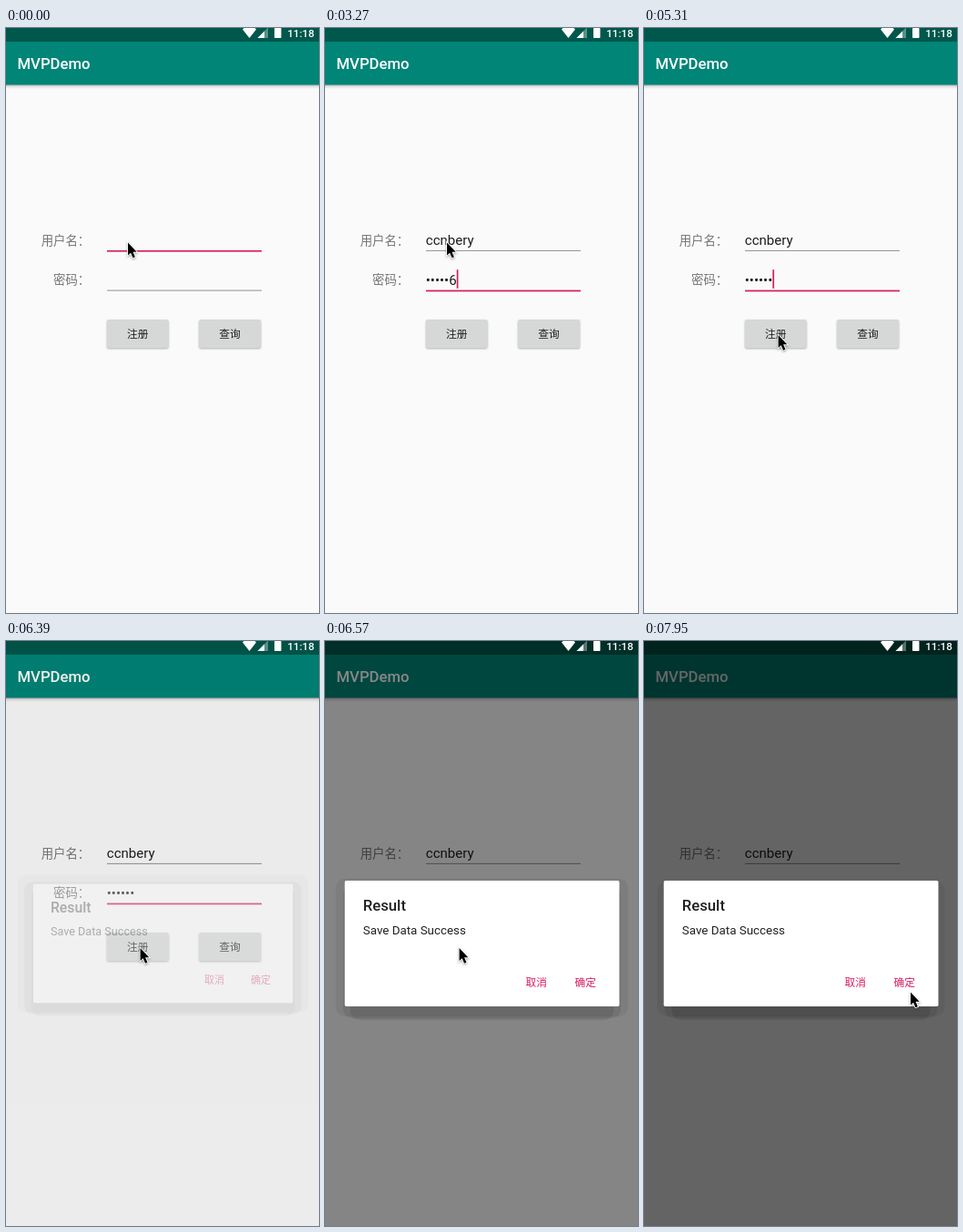
Write an HTML page that moves like this. It is 344 by 642 pixels and loops after 8000 ms.

```html
<!DOCTYPE html>
<html lang="zh-CN">
<head>
<meta charset="utf-8">
<title>MVPDemo</title>
<style>
  html, body { margin: 0; width: 100%; height: 100%; overflow: hidden; background: #fafafa; }
  svg { display: block; width: 100vw; height: 100vh; }
  text { font-family: Roboto, 'Noto Sans CJK SC', 'Noto Sans CJK', sans-serif; white-space: pre; }
  .title { font-size: 16.72px; font-weight: 500; }
  .label { font-size: 13.38px; fill: #757575; }
  .input { font-size: 15.05px; fill: #1d1d1d; }
  .button { font-size: 11.7px; fill: #202020; text-anchor: middle; }
  .accent { fill: #d81b60; }
  .raised { fill: #d6d7d7; filter: drop-shadow(0 1px 1px rgba(0,0,0,.3)); }
  .pressed { fill: #c4c5c5; filter: drop-shadow(0 2px 1.5px rgba(0,0,0,.38)); }
</style>
</head>
<body>
<svg viewBox="0 0 344 642">
  <defs>
    <linearGradient id="barShadow" x2="0" y2="1">
      <stop offset="0" stop-opacity=".32"/>
      <stop offset=".45" stop-opacity=".1"/>
      <stop offset="1" stop-opacity="0"/>
    </linearGradient>
  </defs>
  <rect width="344" height="642" fill="#fafafa"/>
  <rect y="62" width="344" height="5" fill="url(#barShadow)"/>
  <rect width="344" height="62.4" fill="#008577"/>
  <rect width="344" height="15" fill="#00574b"/>
  <text class="title" x="12.5" y="45.3" fill="#fff">MVPDemo</text>

  <text class="label" x="38.7" y="237.8">用户名：</text>
  <text class="label" x="52" y="281.3">密码：</text>
  <rect id="userLine" x="111" width="170"/>
  <rect id="passLine" x="111" width="170"/>
  <text id="user" class="input" x="110.8" y="238"></text>
  <text id="pass" class="input" x="110.8" y="281.7"></text>
  <rect id="caret" class="accent" width="1.7" height="20.6"/>

  <rect id="register" x="111" y="320" width="67.5" height="31" rx="1.7"/>
  <rect class="raised" x="212.3" y="320" width="67.7" height="31" rx="1.7"/>
  <text class="button" x="144.7" y="340">注册</text>
  <text class="button" x="246" y="340">查询</text>

  <rect id="dim" width="344" height="642"/>
  <g fill="#fff">
    <path d="M260 1.5Q261.500 0 263 -1H272Q273.500 0 275 1.500L267.500 11Z"/>
    <path d="M276.500 11 288 -.5V11Z" fill-opacity=".35"/>
    <path d="M276.500 11 284 3.500V11Z"/>
    <rect x="295" y="0" width="7.500" height="11" rx=".7"/>
    <text x="309.200" y="10.200" font-size="11.7" font-weight="500">11:18</text>
  </g>

  <g id="dialog">
    <g id="shadows">
      <rect fill-opacity=".06"/>
      <rect fill-opacity=".09"/>
      <rect fill-opacity=".09"/>
    </g>
    <rect x="21.700" y="263" width="301.800" height="138" rx="1.700" fill="#fff"/>
    <text class="title" x="41.800" y="296" fill="#212121">Result</text>
    <text x="41.800" y="322" font-size="13.38" fill="#212121">Save Data Success</text>
    <text class="button" x="232.300" y="378.700" style="fill:#d81b60">取消</text>
    <text class="button" x="286.300" y="378.700" style="fill:#d81b60">确定</text>
  </g>

  <path id="cursor" d="M0 0V14L3.100 11.200 5.500 16.700 7.900 15.700 5.500 10.300H9.700Z"
    stroke="#fff" stroke-width="1.800" paint-order="stroke"
    style="filter:drop-shadow(0 1px 1px rgba(0,0,0,.35))"/>
</svg>
<script>
const LOOP = 8000, BLINK = 530;
const USER = 'ccnbery', PASSWORD = '123456';
const userKeys = [90, 170, 350, 530, 700, 1150, 1230];
const passKeys = [2120, 2300, 2470, 2830, 3100, 3270];
const FOCUS = 1500, MASK = 4780, PRESS = 5850;
const dialogTicks = [6390, 6480, 6570, 6680];

const el = id => document.getElementById(id);
const set = (node, attrs) => {
  for (const name in attrs) node.setAttribute(name, attrs[name]);
};
const countPast = (times, t) => times.filter(time => time <= t).length;
const clamp = x => Math.max(0, Math.min(1, x));
const smooth = x => x * x * (3 - 2 * x);

// Progress of a movement that advances in equal, held steps.
const stepped = (t, start, end, steps) =>
  clamp((Math.floor((t - start) / ((end - start) / (steps - 1)) + 1e-6) + 1) / steps);

function drawLine(id, y, focused) {
  set(el(id), { y, height: focused ? 1.7 : 0.9, fill: focused ? '#d81b60' : '#858585' });
}

function caretVisible(t) {
  if (t < userKeys[0] || t >= PRESS) return false;
  if (t < passKeys[0]) return t < FOCUS + BLINK;
  if (t < 3720) return true;
  return Math.floor((t - 3720) / BLINK) % 2 === 1;
}

function drawForm(t) {
  const inPassword = t >= FOCUS;
  const typed = countPast(passKeys, t);
  const hidden = t >= MASK ? typed : Math.max(0, typed - 1);
  el('user').textContent = USER.slice(0, countPast(userKeys, t));
  el('pass').textContent = '•'.repeat(hidden) + PASSWORD.slice(hidden, typed);
  drawLine('userLine', 243.9, !inPassword);
  drawLine('passLine', 287.6, inPassword);

  const field = el(inPassword ? 'pass' : 'user');
  set(el('caret'), {
    x: 110.9 + field.getComputedTextLength(),
    y: inPassword ? 265.2 : 221.3,
    visibility: caretVisible(t) ? 'visible' : 'hidden'
  });
  set(el('register'), { class: t >= PRESS && t < dialogTicks[0] ? 'pressed' : 'raised' });
}

function drawDialog(t) {
  const ticks = countPast(dialogTicks, t);
  const age = ticks ? dialogTicks[ticks - 1] - 6365 : 0;
  const dim = 0.6 * clamp(age / 262);
  const scale = 1 - 0.1 * (1 - clamp(age / 220)) ** 5;
  set(el('dim'), { 'fill-opacity': dim });
  set(el('dialog'), {
    opacity: 1 - (1 - clamp(age / 150)) ** 2,
    transform: `translate(172.5 332) scale(${scale}) translate(-172.5 -332)`
  });
  // Shadow bands tighten as the backdrop darkens.
  const spread = 20 - 21 * dim;
  [...el('shadows').children].forEach((band, i) => {
    const grow = spread - 8 * i;
    set(band, {
      x: 22 - grow, y: 271 - grow, rx: 10,
      width: 301 + 2 * grow, height: 141 + spread + grow - 6 * i - spread + (i ? 8 * i : 0)
    });
  });
}

function cursorPosition(t) {
  if (t < 3720) return [134, 235.5];
  if (t < 4510) {
    const p = smooth(stepped(t, 3720, 4240, 7));
    return [134 + 14 * p + 7 * Math.sin(Math.PI * p), 235.5 + 101 * p];
  }
  const p = t < 7160 ? 0 : smooth(stepped(t, 7160, 7950, 10));
  return [147.6 + 145.4 * p, 337 + 48.5 * p];
}

function draw() {
  const t = performance.now() % LOOP;
  drawForm(t);
  drawDialog(t);
  set(el('cursor'), { transform: `translate(${cursorPosition(t)})` });
  requestAnimationFrame(draw);
}
draw();
</script>
</body>
</html>
```
